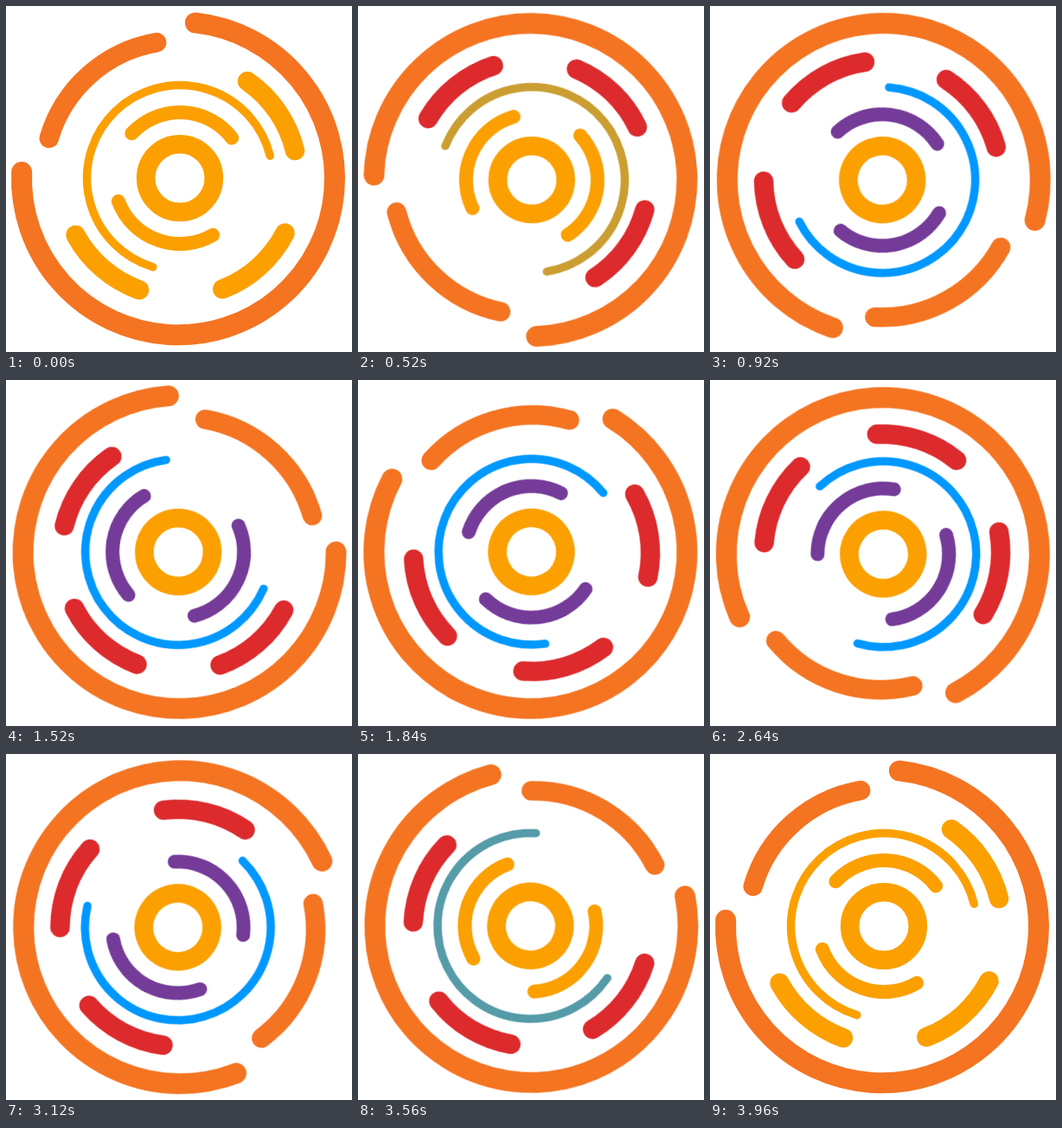
These frames come from a looping animation (400 by 400 pixels, 4000 ms). An HTML page:

```html
<!DOCTYPE html>
<html lang="en">
<head>
<meta charset="utf-8">
<title>Rotating rings</title>
<style>
  html, body { margin: 0; width: 100%; height: 100%; overflow: hidden; background: #fff; }
  svg { display: block; width: 100%; height: 100%; }
  g { transform-box: view-box; transform-origin: 200px 200px; }
  path, circle { fill: none; stroke-linecap: round; }
</style>
</head>
<body>
<svg viewBox="0 0 400 400">
  <g id="left"></g>
  <g id="right"></g>
</svg>
<script>
const LOOP = 4000;
const AMBER = '#fba000', ORANGE = '#f47421', RED = '#dc2a2d', BLUE = '#0098ff', PURPLE = '#753b98';
const left = document.getElementById('left');
const right = document.getElementById('right');

function add(parent, tag, attrs) {
  const node = document.createElementNS('http://www.w3.org/2000/svg', tag);
  for (const key in attrs) node.setAttribute(key, attrs[key]);
  return parent.appendChild(node);
}

// Arc clockwise from `start` degrees, measured from the positive x axis.
function arc(parent, [cx, cy], radius, width, start, span, color) {
  const point = deg => {
    const a = deg * Math.PI / 180;
    return `${(cx + radius * Math.cos(a)).toFixed(2)} ${(cy + radius * Math.sin(a)).toFixed(2)}`;
  };
  const d = `M${point(start)}A${radius} ${radius} 0 ${span > 180 ? 1 : 0} 1 ${point(start + span)}`;
  return add(parent, 'path', { d, stroke: color, 'stroke-width': width });
}

function play(node, keyframes) {
  node.animate(keyframes, { duration: LOOP, iterations: Infinity, delay: -1 });
}

// Two turns in 99 steps of 40 ms; the last step repeats the starting pose.
function spin(node, degrees) {
  play(node, [
    { offset: 0, transform: 'rotate(0deg)', easing: 'steps(99)' },
    { offset: 0.99, transform: `rotate(${degrees}deg)` },
    { offset: 1, transform: `rotate(${degrees}deg)` }
  ]);
}

// Amber to `color` and back again; times in ms.
function tint(nodes, color, [inStart, inEnd, outStart, outEnd]) {
  const steps = [
    [0, AMBER], [inStart, AMBER], [inEnd, color],
    [outStart, color], [outEnd, AMBER], [LOOP, AMBER]
  ];
  const frames = steps.map(([time, stroke]) => ({ offset: time / LOOP, stroke, easing: 'ease-in-out' }));
  nodes.forEach(node => play(node, frames));
}

// Counter-clockwise: outer rings and the three dashes
arc(left, [199, 199.3], 181, 24, -83.7, 266, ORANGE);
arc(left, [201, 197.5], 157.7, 22.5, 196.4, 63.8, ORANGE);
const dashes = [-55.2, 27.4, 110].map(start => arc(left, [200.9, 199.5], 137, 22.5, start, 41.5, AMBER));

// Clockwise: thin ring, inner pair and hub
const hub = [201, 199];
const thin = arc(right, hub, 107.4, 9.5, 106.9, 239.2, AMBER);
const pair = [222.9, 60].map(start => arc(right, hub, 76, 16, start, 99.4, AMBER));
add(right, 'circle', { cx: hub[0], cy: hub[1], r: 39.3, stroke: AMBER, 'stroke-width': 21.6 });

spin(left, -720);
spin(right, 720);
tint(dashes, RED, [120, 440, 3560, 3880]);
tint([thin], BLUE, [400, 800, 3400, 3800]);
tint(pair, PURPLE, [560, 880, 3240, 3560]);
</script>
</body>
</html>
```
